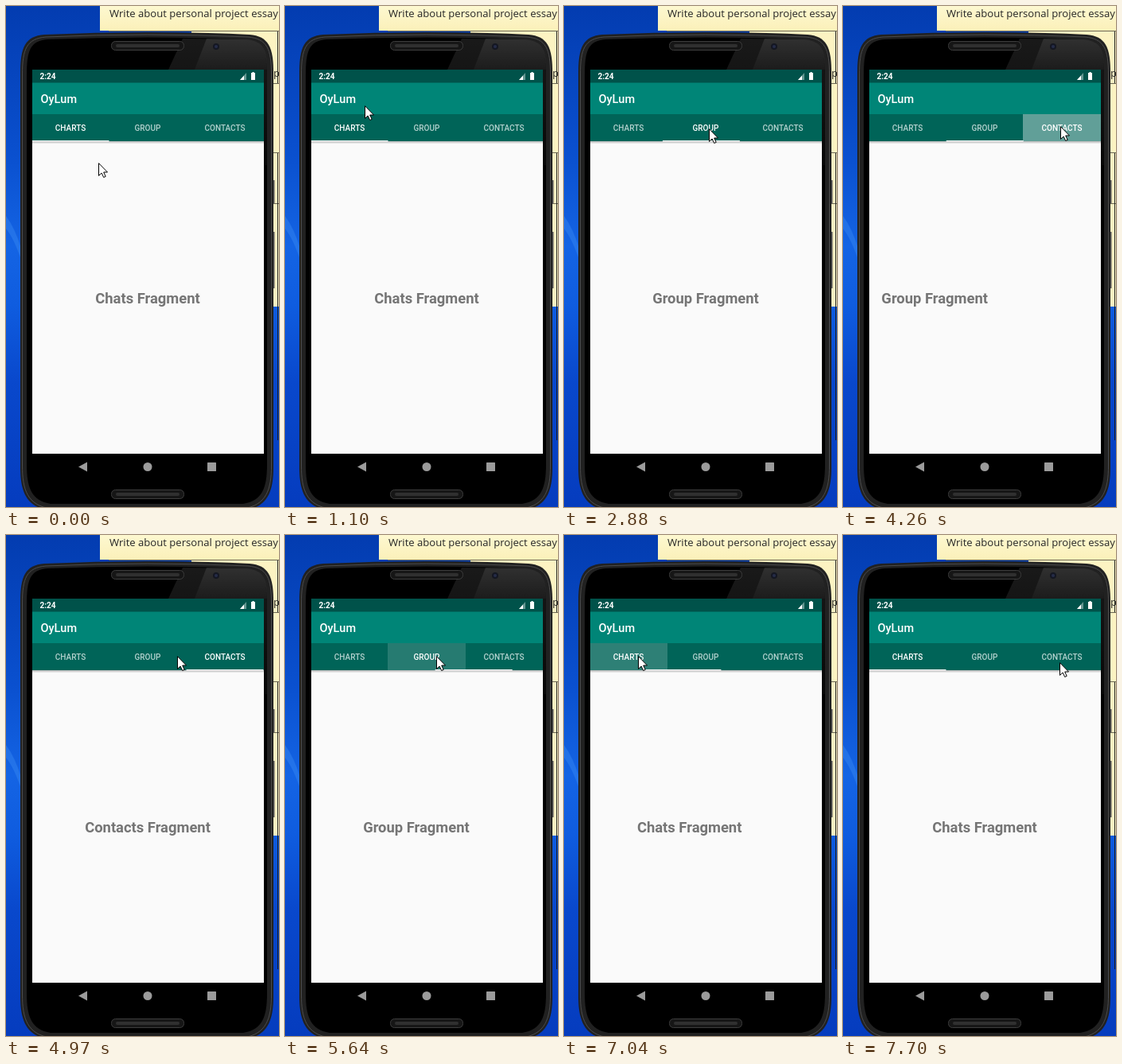
Animation of 343x630 px, one loop 8 s. Source, as an HTML page:

```html
<!DOCTYPE html>
<html lang="en">
<head>
<meta charset="utf-8">
<title>Tabs demo</title>
<style>
html, body { margin: 0; width: 100%; height: 100%; overflow: hidden; background: #0a3cc4; }
svg { display: block; width: 343px; height: 630px; }
text { font-family: Roboto, Arial, sans-serif; }
.note { font-family: "Open Sans", "Noto Sans", sans-serif; font-size: 13.1px; fill: #262626; }
.tab { font-size: 10px; font-weight: 500; fill: #fff; text-anchor: middle; }
.page { font-size: 18.4px; font-weight: 700; fill: #757575; text-anchor: middle; }
</style>
</head>
<body>
<svg viewBox="0 0 343 630">
  <defs>
    <linearGradient id="sky" x1="0" y1="0" x2="0" y2="1">
      <stop offset="0" stop-color="#033cb0"/>
      <stop offset=".3" stop-color="#0a50cf"/>
      <stop offset=".48" stop-color="#1464e4"/>
      <stop offset=".6" stop-color="#0f5cdf"/>
      <stop offset=".75" stop-color="#0948cc"/>
      <stop offset="1" stop-color="#053cbe"/>
    </linearGradient>
    <linearGradient id="paper" x1="0" y1="0" x2="0" y2="1">
      <stop offset="0" stop-color="#fdf8d0"/>
      <stop offset="1" stop-color="#fbf0b9"/>
    </linearGradient>
    <linearGradient id="gloss" x1="0" y1="0" x2="0" y2="1">
      <stop offset="0" stop-color="#fff" stop-opacity=".1"/>
      <stop offset="1" stop-color="#fff" stop-opacity=".03"/>
    </linearGradient>
    <linearGradient id="shade" x1="0" y1="0" x2="0" y2="1">
      <stop offset="0" stop-color="#000" stop-opacity=".32"/>
      <stop offset="1" stop-color="#000" stop-opacity="0"/>
    </linearGradient>
    <clipPath id="screen"><rect x="33" y="80" width="291" height="483"/></clipPath>
    <g id="speaker">
      <rect x="132.5" width="91" height="11" rx="5" fill="#161616" stroke="#3d3d3d"/>
      <rect x="138" y="3.5" width="80" height="4" rx="2" fill="#303030"/>
    </g>
  </defs>

  <rect width="343" height="630" fill="url(#sky)"/>
  <path d="M0 264Q12 280 20 308V322Q10 292 0 280Z" fill="#3d8cf2" opacity=".4"/>

  <!-- sticky notes -->
  <rect x="118" width="225" height="31" fill="url(#paper)"/>
  <text class="note" x="130" y="14">Write about personal project essay</text>
  <rect x="233" y="31" width="110" height="347" fill="#fcf3c2"/>
  <path d="M129 31.5H343M330 97.5H343M330 184.5H343M330 248.5H343" stroke="#6b6754"/>
  <path d="M341.5 32V97M341.5 185V546" stroke="#1b1b1b"/>
  <text class="note" x="328" y="89">opp</text>

  <!-- phone -->
  <path d="M334 219H337.5V248H334ZM334 284H337.5V355H334Z" fill="#5c5c5c"/>
  <path d="M18 84C18 52 24 38 48 36Q178 30 306 36C330 38 336 52 336 84V580C336 610 329 630 300 634H54C25 630 18 610 18 580Z" fill="#212121"/>
  <path d="M20.5 86C20.5 54 26 41 50 39Q178 33 304 39C328 41 333.5 54 333.5 86V578C333.5 608 327 628 298 632H56C27 628 20.5 608 20.5 578Z" fill="none" stroke="#4c4c4c"/>
  <path d="M26 88C26 56 30 44 52 42Q178 37 302 42C324 44 328 56 328 88V576C328 606 322 622 298 626H56C32 622 26 606 26 576Z" fill="#000"/>
  <g fill="url(#gloss)">
    <path d="M222 41L302 42C324 44 328 56 328 88V200H324V80H204Z"/>
    <path d="M252 41L302 42C324 44 328 56 328 80H237Z"/>
  </g>
  <use href="#speaker" y="44.5"/>
  <use href="#speaker" y="608.5"/>
  <circle cx="264" cy="51" r="4" fill="#141722"/>
  <circle cx="264" cy="51" r="2" fill="#252c48"/>
  <g fill="#9b9b9b">
    <path d="M91 579.5L102 573.5V585.5Z"/>
    <circle cx="178" cy="579.5" r="5.5"/>
    <rect x="253" y="574" width="11" height="11" rx=".5"/>
  </g>

  <g clip-path="url(#screen)">
    <rect x="33" y="80" width="291" height="483" fill="#fafafa"/>
    <g id="pages"></g>
    <rect x="33" y="169.5" width="291" height="4" fill="url(#shade)"/>
    <rect x="33" y="80" width="291" height="17" fill="#00524a"/>
    <rect x="33" y="96.5" width="291" height="40" fill="#008577"/>
    <rect x="33" y="136" width="291" height="34" fill="#006458"/>
    <rect id="ripple" y="136" width="98" height="34" fill="#fff"/>
    <g id="tabs"></g>
    <rect id="bar" y="169" width="97" height="1.5" fill="#f2f6f5"/>
    <text x="42.5" y="92" font-size="10" font-weight="700" fill="#fff">2:24</text>
    <text x="43.5" y="122" font-size="14.5" font-weight="500" fill="#fff">OyLum</text>
    <path d="M294 93L302 84V93Z" fill="#fff" opacity=".4"/>
    <path d="M294 93L299 87.5V93Z" fill="#fff"/>
    <path d="M308 84H309.5V83H311.5V84H313V93H308Z" fill="#fff"/>
  </g>

  <path id="cursor" d="M.5 .7V16.4L4.1 13L6.7 18.5L9.2 17.4L6.7 12H11.5Z" fill="#fff" stroke="#000"/>
</svg>
<script>
const LOOP = 8000, TICK = 137.5, LEFT = 32.5, WIDTH = 291, TAB = WIDTH / 3;
const NS = "http://www.w3.org/2000/svg";
const $ = id => document.getElementById(id);

// pointer strokes: start and end time, then where the tip arrives
const HOME = [116, 197];
const MOVES = [
  [270, 690, 62, 130], [690, 960, 70, 113], [960, 1370, 123, 134],
  [1370, 2060, 182, 154], [3200, 3850, 273, 151], [4747, 5197, 190, 152],
  [5900, 6460, 93, 152], [7020, 7700, 272, 160]];

// time of each page change and the tab it opens
const TAPS = [[2675, 1], [4253, 2], [5545, 1], [6930, 0]];

const clamp = v => Math.max(0, Math.min(1, v));
const mix = (a, b, k) => a + (b - a) * k;
const easeOut = (k, power) => 1 - (1 - k) ** power;

// cubic-bezier(.4, 0, .2, 1)
function fastOutSlowIn(k) {
  let lo = 0, hi = 1, s = .5;
  for (let i = 0; i < 20; i++) {
    s = (lo + hi) / 2;
    const x = 1.2 * (1 - s) ** 2 * s + .6 * (1 - s) * s * s + s ** 3;
    if (x < k) lo = s; else hi = s;
  }
  return 3 * (1 - s) * s * s + s ** 3;
}

function addText(parent, cls, x, y, label) {
  const el = document.createElementNS(NS, "text");
  el.setAttribute("class", cls);
  el.setAttribute("x", x);
  el.setAttribute("y", y);
  el.textContent = label;
  $(parent).append(el);
  return el;
}

const tabs = ["CHARTS", "GROUP", "CONTACTS"].map((s, i) =>
  addText("tabs", "tab", LEFT + TAB * (i + .5), 157, s));
["Chats", "Group", "Contacts"].forEach((s, i) =>
  addText("pages", "page", 178 + WIDTH * i, 373.5, s + " Fragment"));

function cursorAt(t) {
  let [x, y] = HOME;
  for (const [start, end, toX, toY] of MOVES) {
    const k = easeOut(clamp((t - start) / (end - start)), 2);
    x = mix(x, toX, k);
    y = mix(y, toY, k);
  }
  return [Math.round(x), Math.round(y)];
}

function draw(t) {
  let page = 0, bar = 0, active = 0, glow = 0, pressed = 0;
  for (const [go, to] of TAPS) {
    const since = t - go;
    if (since < -120) break;
    pressed = to;
    glow = clamp((since + 120) / 60) * clamp(1 - (since - 20) / 120);
    if (since < 0) break;
    page = mix(active, to, easeOut(clamp(since / 200), 5));
    bar = mix(active, to, fastOutSlowIn(clamp(since / 300)));
    active = to;
  }
  $("pages").setAttribute("transform", `translate(${-page * WIDTH} 0)`);
  $("bar").setAttribute("x", LEFT + bar * TAB);
  $("ripple").setAttribute("x", Math.floor(LEFT + pressed * TAB));
  $("ripple").setAttribute("opacity", glow * .38);
  tabs.forEach((el, i) => el.setAttribute("opacity", i === active ? 1 : .7));
  $("cursor").setAttribute("transform", `translate(${cursorAt(t).join(" ")})`);
}

// the picture refreshes in even steps, like a screen recording
const start = performance.now();
function loop() {
  const t = (performance.now() - start) % LOOP;
  draw(Math.floor((t + 25) / TICK) * TICK);
  requestAnimationFrame(loop);
}
loop();
</script>
</body>
</html>
```
